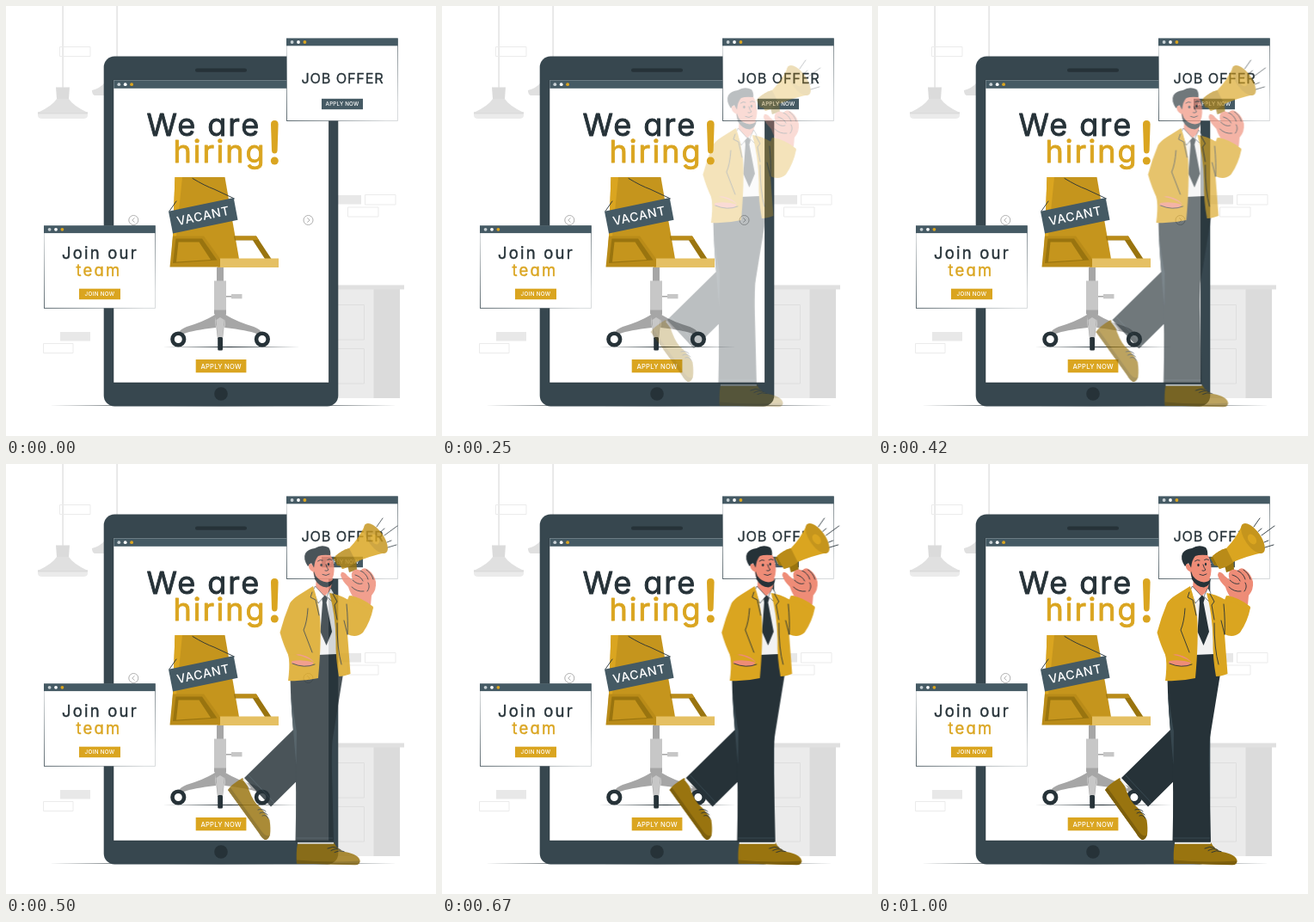
An HTML page for the animation above (1040 ms loop, 500x500 px).

```html
<!DOCTYPE html>
<html lang="en">
<head>
<meta charset="utf-8">
<title>We are hiring</title>
<style>
html, body { margin: 0; width: 100%; height: 100%; overflow: hidden; background: #fff; }
svg { display: block; width: 100%; height: 100%; }
text { font-family: Inter, Lato, sans-serif; font-feature-settings: "cv11"; stroke-linejoin: round; stroke-linecap: round; }
.dark { fill: #263238; stroke: #263238; }
.gold { fill: #daa520; stroke: #daa520; }
.title { font-size: 36px; letter-spacing: 2px; stroke-width: .9; }
.sub { font-size: 18.5px; letter-spacing: 2.2px; stroke-width: .4; }
.offer { font-size: 16.3px; letter-spacing: .8px; stroke-width: .3; }
.label { fill: #fff; font-weight: 500; text-anchor: middle; }
.line { fill: none; stroke: #263238; stroke-width: .9; stroke-linecap: round; stroke-linejoin: round; }
.man { animation: slide 1040ms linear infinite, fade 1040ms linear infinite; }
@keyframes slide {
  0% { transform: translateX(-30px); }
  7.69% { transform: translateX(-29.3px); }
  16.35% { transform: translateX(-26px); }
  24.04% { transform: translateX(-21.3px); }
  31.73% { transform: translateX(-16px); }
  40.38% { transform: translateX(-10.6px); }
  48.08% { transform: translateX(-6px); }
  55.77% { transform: translateX(-2.3px); }
  64.42% { transform: translateX(.6px); }
  72.12% { transform: translateX(1.8px); }
  79.81% { transform: translateX(2px); }
  88.46% { transform: translateX(1px); }
  96.15%, 100% { transform: translateX(0); }
}
@keyframes fade {
  0%, 7.69% { opacity: 0; }
  16.35% { opacity: .15; }
  31.73% { opacity: .47; }
  48.08% { opacity: .83; }
  55.77%, 100% { opacity: 1; }
}
</style>
</head>
<body>
<svg viewBox="0 0 500 500">
  <defs>
    <linearGradient id="edge" x1="0" y1="1" x2="1" y2="0">
      <stop offset="0" stop-color="#37474f"/>
      <stop offset=".45" stop-color="#37474f" stop-opacity=".25"/>
      <stop offset=".6" stop-color="#37474f" stop-opacity=".25"/>
      <stop offset="1" stop-color="#37474f" stop-opacity=".8"/>
    </linearGradient>
    <g id="dots">
      <circle r="1.9" fill="#c7d0d4"/>
      <circle cx="7.4" r="1.9" fill="#fff"/>
      <circle cx="14.8" r="1.9" fill="#daa520"/>
    </g>
    <g id="window">
      <rect x=".4" y=".4" width="129" height="95.6" fill="#fff" stroke="url(#edge)" stroke-width=".8"/>
      <rect width="129.6" height="8.8" fill="#455a64"/>
      <use href="#dots" x="6.6" y="4.5"/>
    </g>
    <g id="leg">
      <path d="M243 359Q230 367 210 373Q202 376 200 381L207 381Q217 377 244 374Z" fill="#a6a6a6"/>
      <circle cx="200.3" cy="387.5" r="6.8" fill="#fff" stroke="#263238" stroke-width="4.6"/>
    </g>
    <g id="arrow" fill="none" stroke="#a6a6a6" stroke-width=".9">
      <circle r="5.5"/>
      <path d="M1.2 -2.6L-1.6 0L1.2 2.6"/>
    </g>
  </defs>
  <rect width="500" height="500" fill="#fff"/>

  <!-- room -->
  <g fill="#e0e0e0">
    <path d="M65.4 0H66.8V95H65.4ZM128.4 0H129.8V60H128.4Z"/>
    <path d="M58 94.500H74L73 108H59Z" fill="#dbdbdb"/>
    <path d="M59 108H73Q78 116 95 124H37Q54 116 59 108Z"/>
    <path d="M37 123.500H95V127Q95 131 90 131H42Q37 131 37 127Z" fill="#ebebeb"/>
    <path d="M37 123.500H95V125.500H37Z" fill="#dbdbdb"/>
    <path d="M116 90V104H103Q100 103 100 98Q110 95 114 90Z"/>
  </g>
  <g fill="#e8e8e8">
    <rect x="63" y="379" width="35" height="10.500"/>
    <rect x="378" y="220" width="35" height="10.500"/>
  </g>
  <path d="M62.500 47.500H98V58.500H62.500ZM43.500 392.500H78V403.500H43.500ZM417.500 219.500H453V231H417.500ZM397.500 234H433V245H397.500Z" fill="none" stroke="#ebebeb"/>
  <path d="M380 329H428V456H380Z" fill="#ebebeb"/>
  <path d="M427.500 329H458V456H427.500Z" fill="#dbdbdb"/>
  <path d="M380 324.500H463V329.500H380Z" fill="#e0e0e0"/>
  <path d="M380 347.500H416.500V388H380M380 398.500H416.500V439H380" fill="none" stroke="#dedede"/>
  <path d="M50 464.500L250 463.800L455 464.500L250 465.200Z" fill="#263238"/>

  <!-- tablet -->
  <rect x="113.700" y="58.500" width="272.600" height="407" rx="12.500" fill="#37474f"/>
  <rect x="220" y="72.500" width="60" height="4.300" rx="2.100" fill="#263238"/>
  <circle cx="250" cy="451" r="7.800" fill="#263238"/>
  <rect x="125" y="86" width="250.300" height="352" fill="#fff" stroke="#263238" stroke-width=".5"/>
  <rect x="125.300" y="86.300" width="249.700" height="9.500" fill="#455a64"/>
  <use href="#dots" x="131.300" y="91.200"/>

  <text class="title dark" x="163.500" y="150.500">We are</text>
  <text class="title gold" x="194.500" y="182">hiring</text>
  <path d="M308 137.500Q308 133 312.300 133Q316.600 133 316.600 137.500L315.600 168Q315.300 171.500 312.300 171.500Q309.300 171.500 309 168Z" fill="#daa520"/>
  <circle cx="312.300" cy="180" r="4.500" fill="#daa520"/>
  <use href="#arrow" x="148.300" y="249"/>
  <use href="#arrow" transform="translate(351.500 249) scale(-1 1)"/>

  <!-- chair -->
  <path d="M182 396.500L260 396L342 396.500L260 397Z" fill="#263238"/>
  <path d="M196.500 199H254.500L271 294H193Z" fill="#c5951d"/>
  <path d="M196.500 199H205L198 268L193 294Z" fill="#daa520"/>
  <path d="M265 267.500H291L308.500 294H301L287 272.500H266Z" fill="#99740f"/>
  <path d="M266 267.500H291L294 272H267Z" fill="#b98b18"/>
  <path d="M246 293.500H317V304H246Z" fill="#e5c063"/>
  <path d="M194 267.500H230L249 294V303.500H190.500Z" fill="#b98b18"/>
  <path d="M197.500 270.500H228L245.500 295.500L194 299Z" fill="#99740f"/>
  <path d="M200.500 274.500H224.500L238 295L198 297.500Z" fill="#c5951d"/>
  <path d="M217 200.500Q231 209 242 213L265.500 224M190 238.500L198 227" class="line" stroke-width="1"/>
  <path d="M189 238.700L264.700 223L269.500 248.700L194 264.500Z" fill="#455a64"/>
  <text class="label" font-size="14.200" transform="translate(229.300 244) rotate(-11.800)" y="5" letter-spacing=".6">VACANT</text>
  <path d="M245 304H253V320H245Z" fill="#a6a6a6"/>
  <path d="M242 319.500H256V357H242Z" fill="#c7c7c7"/>
  <path d="M242 353.500H256V358H242ZM256 337H263V338.500H256Z" fill="#a6a6a6"/>
  <rect x="262" y="335" width="12.500" height="5.300" fill="#c7c7c7"/>
  <use href="#leg"/>
  <use href="#leg" transform="translate(498.200 0) scale(-1 1)"/>
  <path d="M242.500 357.500H256L253.500 374L252 387H246L244.500 374Z" fill="#a6a6a6"/>
  <path d="M244.500 365L249 362L253.800 365L252 386H246Z" fill="#c7c7c7"/>
  <rect x="246.200" y="385" width="5.800" height="15.500" rx="1.500" fill="#263238"/>

  <rect x="220.700" y="411" width="58.700" height="15.300" fill="#daa520"/>
  <text class="label" font-size="7.600" x="250.100" y="421.500" letter-spacing=".2">APPLY NOW</text>

  <!-- pop-ups -->
  <use href="#window" x="44" y="255.300"/>
  <text class="sub dark" x="65" y="294">Join our</text>
  <text class="sub gold" x="81.500" y="314">team</text>
  <rect x="85" y="328.700" width="48" height="12.500" fill="#daa520"/>
  <text class="label" font-size="6.300" x="109" y="337.200" letter-spacing=".3">JOIN NOW</text>
  <use href="#window" x="326" y="37.500"/>
  <text class="offer dark" x="343.500" y="89.800">JOB OFFER</text>
  <rect x="367" y="107.800" width="48" height="12.400" fill="#455a64"/>
  <text class="label" font-size="6.200" x="391" y="116.300" letter-spacing=".2">APPLY NOW</text>

  <g class="man">
    <!-- shoes -->
    <path d="M264 379Q266 374 281 365L286 372Q291 388 297 395Q307 404 312.500 414Q314 424 313 431Q311 437 307 437Q303 434 300 429Z" fill="#99740f"/>
    <path d="M264 379L267 376.500L303 427Q309 435 313 431Q311 437 307 437Q303 435 300 429Z" fill="#7d5f0c"/>
    <path d="M299 402Q304 400 308 404M301 406Q306 403 310 408M304 409Q308 407 311 412" class="line" stroke-width="1.300"/>
    <path d="M345 441L387 440Q391 448 400 451Q416 454 417.500 461Q417.500 466 412 466L344 464.500Q343 452 345 441Z" fill="#99740f"/>
    <path d="M343.700 460.500Q380 464 417.500 461.500Q417.500 466 412 466.300L344 464.500Z" fill="#7d5f0c"/>
    <path d="M380 447Q386 444 391 446M384 449.500Q390 446 395 448.500M388 451.500Q393 448.500 399 450.500" class="line" stroke-width="1.300"/>
    <path d="M282 366.500L290 377M345 440.800H387" stroke="#f2f2f2" stroke-width="2"/>

    <!-- trousers -->
    <path d="M350 220H391L398 244L386 318Q384 330 377 336L314 398.500L283 365L341 308Z" fill="#263238"/>
    <path d="M336.500 247L368 220H388L388 300Q384 320 385 360L387 439.500H342.500Q344 380 342 330Q337 285 336.500 247Z" fill="#263238"/>
    <path d="M337 265Q341 295 344 311L343.500 350Q339 303 337 265Z" fill="#37474f"/>
    <path d="M288 362L318 394M343.500 435H386" fill="none" stroke="#455a64" stroke-width=".6"/>

    <!-- shirt and tie -->
    <path d="M364 143L386 149L393 178L391 221L368 222Z" fill="#f2f2f2"/>
    <path d="M367 131L386 134L383 147L376 154L366 144Z" fill="#ee8c77"/>
    <path d="M373 155L377 152.500L380 156L378.500 161L385 195L378.500 211L371.500 195L374 161Z" fill="#263238"/>
    <path d="M365.500 142L376 153.500L369 162L363 147ZM383.500 144L379 154L385 160L387 150Z" fill="#fff" stroke="#263238" stroke-width=".6"/>

    <!-- jacket -->
    <path d="M382 150Q392 151 404 158L407 153Q421 157 433 167Q430 183 421 196Q413 203 403 198L406.500 244Q399 247 393 247Q389 225 389.500 205Q389 175 382 150Z" fill="#daa520"/>
    <path d="M363 142Q368 156 371 178Q373 204 369 249Q352 253 334 252Q336 237 335 224Q328 209 324.500 196Q329 179 336 162Q339 157 347 152Z" fill="#daa520"/>
    <path d="M338 224Q344 220 350 222Q359 224 364 230L361 235Q351 236 338 232Z" fill="#ee8c77"/>
    <path d="M334 221Q351 221 365 231Q352 227 339 229L336 233Z" fill="#daa520"/>
    <path d="M357 168Q356 184 352 193L362 219M339 232Q353 238 365 233M362 149L360 155L366 158L370 176M386 151L391 160L388 164L391 181M402 163Q404 184 403 198M403 198L399 182M391 185Q391 215 396 233" class="line" stroke-width=".7"/>

    <!-- head -->
    <path d="M361 114L370 103L383 105Q388 114 387.500 124Q387 136 380 139Q370 140 364 130Z" fill="#ee8c77"/>
    <path d="M357 119Q351 110 354 104Q357 99 365 98Q373 93 381 97Q384 101 383 106Q374 105 369 107Q365 111 364 121L361 115Z" fill="#263238"/>
    <path d="M363 122L366 130Q371 137 379 137.500Q385 137 387 133Q386 142 379 143.500Q370 143 365 134Z" fill="#263238"/>
    <path d="M364 121Q361 114 358 117Q357 123 364 126Z" fill="#ee8c77"/>
    <path d="M368.500 113Q371 110.500 374 112M379.500 111.500Q382 109.500 384.500 111.500" class="line" stroke-width="1.300"/>
    <ellipse cx="372.500" cy="117.500" rx="1.200" ry="1.700" fill="#263238"/>
    <ellipse cx="381" cy="116.500" rx="1.100" ry="1.700" fill="#263238"/>
    <path d="M378 117Q379 121 381 123Q379 125 377 124M374 128.500Q378 131 382 128" class="line" stroke-width=".8"/>

    <!-- megaphone -->
    <path d="M402 114L413 109L414 123L405 126Z" fill="#99740f"/>
    <path d="M386.500 109L392 106L398 119L391 118Z" fill="#99740f"/>
    <path d="M389 107Q397 100 405 98Q416 87 424 70L447.500 103Q429 107 413 114Q405 120 397 122Z" fill="#daa520"/>
    <path d="M389 107Q397 100 405 98L413 114Q405 120 397 122Z" fill="#b98b18"/>
    <ellipse cx="436" cy="86.500" rx="20.500" ry="9" transform="rotate(55 436 86.500)" fill="#c5951d"/>
    <ellipse cx="435" cy="87.500" rx="6.500" ry="4.300" transform="rotate(55 435 87.500)" fill="#daa520"/>
    <path d="M437 73L444 63M442 78.500L446 75M446 83L461 72M449 91L454 89M450 97L460 94" class="line" stroke-width=".7"/>

    <!-- raised hand -->
    <path d="M396 126Q399 125 403 130L409 135Q406 127 410 124Q414 121 418 124Q422 119 427 123Q434 128 436 137Q437 146 431 153L430 164Q419 157 409 154Q405 147 404 143Q396 135 395 129Z" fill="#ee8c77"/>
    <path d="M409 135Q415 141 420 139M412 129Q419 131 421 136M418 124Q425 127 427 134M425 123Q431 127 433 134M408 143Q414 149 422 148M427 138Q430 143 426 148" class="line" stroke-width=".8"/>
    <path d="M405 153Q420 155 433 166L431 172Q417 160 403 158Z" fill="#daa520"/>
  </g>
</svg>
</body>
</html>
```
